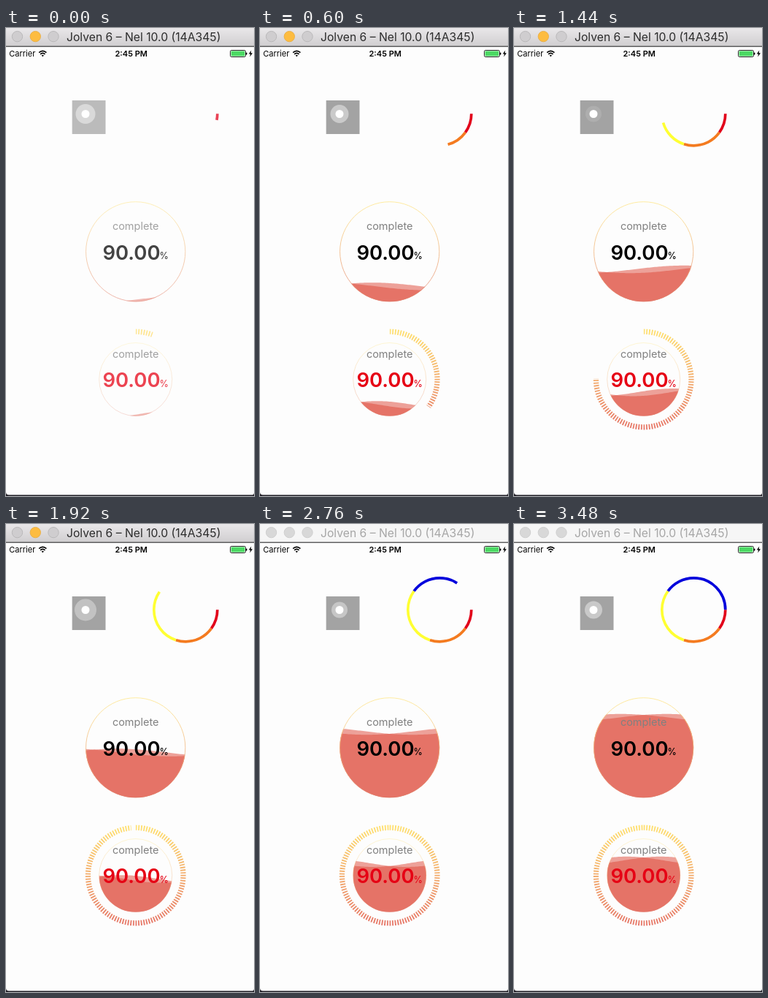
Animation of 340x640 px, one loop 3.6 s. Source, as an HTML page:

```html
<!DOCTYPE html>
<html lang="en">
<head>
<meta charset="utf-8">
<title>Progress views</title>
<style>
  html, body { margin: 0; width: 100%; height: 100%; overflow: hidden; background: #fdfdfd; }
  svg { display: block; width: 340px; height: 640px; font-family: Inter, "Open Sans", sans-serif; }
  .label { font-size: 14.5px; fill: #808080; }
  .value { font-size: 27.5px; font-weight: 600; }
  .unit { font-size: 12.4px; font-weight: 500; }
  .wave { fill: #dd4737; fill-opacity: .5; }
</style>
</head>
<body>
<svg viewBox="0 0 340 640">
  <defs>
    <linearGradient id="bar" x2="0" y2="1">
      <stop stop-color="#e9e7e9"/><stop offset="1" stop-color="#d0ced0"/>
    </linearGradient>
    <linearGradient id="warm" gradientUnits="userSpaceOnUse" x1="0" x2="0" y1="411.5" y2="549.5">
      <stop stop-color="#ffe270"/><stop offset="1" stop-color="#e67567"/>
    </linearGradient>
    <linearGradient id="rim" x2="0" y2="1">
      <stop stop-color="#ffe682"/><stop offset="1" stop-color="#e07a68"/>
    </linearGradient>
    <mask id="sweep" maskUnits="userSpaceOnUse" x="100" y="400" width="156" height="160">
      <circle id="sweepArc" cx="177.7" cy="480.5" r="65.3" pathLength="360" fill="none"
        stroke="#fff" stroke-width="12" transform="rotate(-90 177.7 480.5)"/>
    </mask>
  </defs>

  <rect y="600" width="340" height="40" fill="#222028"/>
  <path d="M0 0H340V635.5Q340 638.6 337 638.6H4Q0 638.6 0 634.5Z" fill="#fdfdfd"/>

  <rect id="titleBar" width="340" height="25" fill="url(#bar)"/>
  <rect y="24.6" width="340" height="1.2" fill="#3c3c3e"/>
  <g id="buttons" stroke-width=".8"></g>
  <text id="title" x="83" y="17.6" font-size="15.7">Jolven 6 – Nel 10.0 (14A345)</text>

  <text x="4.3" y="39" font-size="11">Carrier</text>
  <g fill="none" stroke="#000" stroke-width="1.7">
    <path d="M45.2 33.6Q50.3 29 55.4 33.6M47.1 35.8Q50.3 32.8 53.5 35.8"/>
    <path d="M50.3 39.2L48.7 37.4Q50.3 36 51.9 37.4Z" fill="#000" stroke="none"/>
  </g>
  <text x="171.7" y="39" font-size="11" font-weight="600" text-anchor="middle">2:45 PM</text>
  <rect x="307.5" y="30.5" width="21" height="9" rx="1.8" fill="#fff" stroke="#111" stroke-width=".9"/>
  <rect x="308.6" y="31.6" width="18.8" height="6.8" rx=".8" fill="#4cd964"/>
  <rect x="329" y="33.5" width="1.4" height="3.2" rx=".7"/>
  <path d="M336.3 30.6L332.8 35.6H335.1L334.2 39.6L338 34.3H335.6Z"/>

  <g id="views">
    <rect x="90.7" y="99" width="45.8" height="46" fill="#a3a3a3"/>
    <circle id="halo" cx="109" cy="117.5" fill="#fff"/>
    <circle cx="109" cy="117.5" r="5.5" fill="#fff"/>
    <g id="segments" fill="none" stroke-width="3.7"></g>
    <g id="tanks"></g>
    <g mask="url(#sweep)">
      <path d="M177.7 415.2a65.3 65.3 0 0 1 0 130.6a65.3 65.3 0 0 1 0 -130.6" fill="none"
        stroke="url(#warm)" stroke-width="7.2" stroke-dasharray="1.814"/>
    </g>
  </g>
</svg>
<script>
const LOOP = 3600, STEP = 120, INACTIVE_AT = 2640;
const KEY_TIMES = [0, 360, 960, 1440, 1920, 2760, 3480];
const PHASE = [3.9, 2.1, 0, -1.99, -4.98, -9.42, -12.57];
const LEVEL = [371, 359, 345, 330, 312.5, 283, 265];
const HALO_R = [13.5, 13.5, 11, 11, 15, 11, 12];
const HALO_ALPHA = [.45, .45, .4, .12, .34, .38, .42];
const WAVE = { height: 5.2, shift: .72 };

const el = id => document.getElementById(id);
function set(node, attrs) {
  for (const name in attrs) node.setAttribute(name, attrs[name]);
}
function add(parent, tag, attrs, text) {
  const node = document.createElementNS('http://www.w3.org/2000/svg', tag);
  set(node, attrs);
  if (text) node.textContent = text;
  return parent.appendChild(node);
}
function keyed(values, t) {
  let i = 0;
  while (i < KEY_TIMES.length - 2 && t > KEY_TIMES[i + 1]) i++;
  const p = Math.min(1, (t - KEY_TIMES[i]) / (KEY_TIMES[i + 1] - KEY_TIMES[i]));
  return values[i] + (values[i + 1] - values[i]) * p;
}

const buttons = [15.5, 40.3, 65].map(cx => add(el('buttons'), 'circle', { cx, cy: 11.6, r: 7.2 }));

const segments = [['#e2001a', 0, 36], ['#f47b20', 36, 72], ['#ffff32', 108, 108], ['#0000dc', 216, 144]]
  .map(([stroke, start, span]) => ({
    start, span,
    node: add(el('segments'), 'circle', {
      cx: 246.3, cy: 117.3, r: 43.5, pathLength: 360, stroke, 'stroke-dashoffset': -start
    })
  }));

function makeTank(id, cy, r, rim, color, top) {
  const cx = 177.7, root = el('tanks');
  const clip = add(root, 'clipPath', { id });
  add(clip, 'circle', { cx, cy, r });
  const body = add(root, 'g', { 'clip-path': `url(#${id})` });
  const waves = [1, -1].map(side => ({ side, node: add(body, 'path', { class: 'wave' }) }));
  add(root, 'circle', { cx, cy, r: r - rim / 2, fill: 'none', stroke: 'url(#rim)', 'stroke-width': rim });
  add(root, 'text', { class: 'label', x: cx, y: cy - 29.5, 'text-anchor': 'middle' }, 'complete');
  add(root, 'text', { class: 'value', x: 132.4, y: cy + 10.7, fill: color }, '90.00');
  add(root, 'text', { class: 'unit', x: 210.6, y: cy + 10.4, fill: color }, '%');
  return { cx, cy, r, top, waves };
}
const tanks = [
  makeTank('largeTank', 305.8, 68.5, .75, '#000', 0),
  makeTank('smallTank', 480.5, 50.2, .35, '#e60014', 460)
];

function drawTank({ cx, cy, r, top, waves }, t) {
  const middle = Math.max(top, cy + (keyed(LEVEL, t) - 305.8) * r / 68.5);
  const phase = keyed(PHASE, t), k = Math.PI / (2 * r);
  for (const { side, node } of waves) {
    let d = `M${cx - r} ${cy + r}`;
    for (let x = -r; x <= r + 2; x += 2) {
      const y = middle - WAVE.height * Math.cos(k * x + phase + side * WAVE.shift);
      d += `L${(cx + x).toFixed(2)} ${y.toFixed(2)}`;
    }
    node.setAttribute('d', d + `V${cy + r}Z`);
  }
}

function draw(t) {
  const active = t < INACTIVE_AT;
  el('titleBar').setAttribute('fill', active ? 'url(#bar)' : '#f6f6f6');
  el('title').setAttribute('fill', active ? '#2c2c2c' : '#a6a6a6');
  buttons.forEach((node, i) => {
    const lit = active && i === 1;
    set(node, { fill: lit ? '#fdbc40' : active ? '#cfcdcf' : '#d8d8d8',
      stroke: lit ? '#e8aa3c' : active ? '#b3b1b3' : '#cacaca' });
  });

  el('views').setAttribute('opacity', Math.min(1, .74 + t / 750));
  set(el('halo'), { r: keyed(HALO_R, t), 'fill-opacity': keyed(HALO_ALPHA, t) });

  const angle = Math.min(360, 11.5 + .1057 * t);
  for (const { start, span, node } of segments) {
    const length = Math.max(0, Math.min(span, angle - start));
    set(node, { 'stroke-dasharray': `${length} 720`, visibility: length ? 'visible' : 'hidden' });
  }
  el('sweepArc').setAttribute('stroke-dasharray', `${Math.min(360, 20.5 + .174 * t)} 720`);
  tanks.forEach(tank => drawTank(tank, t));
}

const began = performance.now();
function tick() {
  const t = (performance.now() - began) % LOOP;
  draw(Math.floor(t / STEP) * STEP);
  requestAnimationFrame(tick);
}
tick();
</script>
</body>
</html>
```
